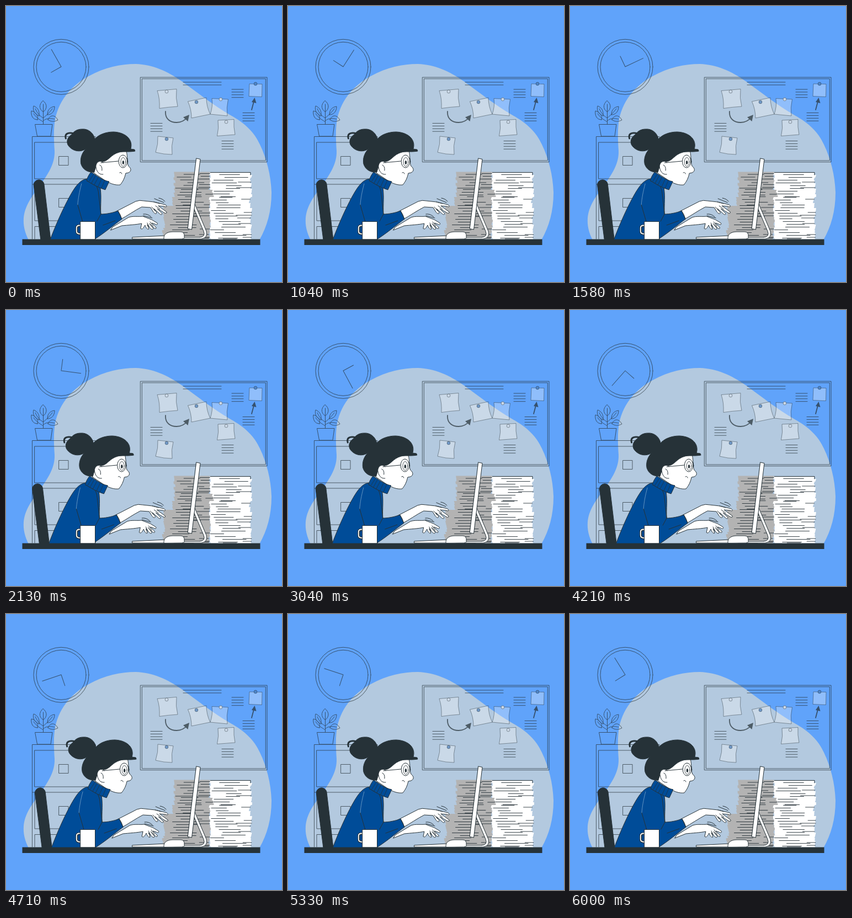
An HTML page for the animation above (6.04 s loop, 500 by 500 pixels).

```html
<!DOCTYPE html>
<html lang="en">
<head>
<meta charset="utf-8">
<title>Busy desk</title>
<style>
html, body { margin: 0; width: 100%; height: 100%; overflow: hidden; background: #60a3fa; }
svg { display: block; width: 100vw; height: 100vh; }
.line { fill: none; stroke: #263238; stroke-width: 1; stroke-linecap: round; stroke-linejoin: round; }
.white { fill: #fff; }
.navy { fill: #004c98; }
.dark { fill: #263238; }
</style>
</head>
<body>
<svg viewBox="0 0 500 500">
  <path fill="#b3c9df" d="M41 424C34 411 31 397 32 384C34 362 47 345 60 327C76 305 89 286 88 262C87 245 86 229 88 212C93 173 118 144 150 127C179 111 208 105 235 105C266 106 292 118 318 136C347 157 376 180 407 198C434 213 450 229 460 251C472 276 480 306 481 338C481 371 473 400 459 424Z"/>

  <g class="line" opacity=".72">
    <circle cx="100" cy="110.300" r="50"/>
    <circle cx="100" cy="110.300" r="45"/>
    <path id="hands" d="M100 74V110H79"/>
    <path d="M47.500 422V236.500H162V422M52 247H157V313H52ZM47.500 323H162M52 323V389H157V323M52 422V399.500H157V422M96 272.500H113V288.500H96ZM96 348.500H113V364.500H96Z"/>
    <path d="M53 214.500H84L81 236H57ZM67.500 214V178M67.500 210C62 206 56 204 50 195M67.500 208C73 203 80 203 88 205M67.500 203C61 199 57 195 53 186M67.500 203C73 198 78 194 84 186"/>
    <path d="M67.500 192C59 186 60 178 67 171.500C75 178 75 186 67.500 192ZM60 199C51 196 48 188 50 181C58 184 61 191 60 199ZM75 197C75 188 80 183 88 182C88 191 83 197 75 197ZM57 206C48 206 45 198 46 190C54 192 59 199 57 206ZM76 206C80 197 88 196 94 206.500C88 210 81 210 76 206Z"/>
    <path d="M243.700 129.200H473V282.700H243.700ZM246.700 131.800H470.300V280H246.700ZM321 138H390M321 143H390"/>
    <path id="memos"/>
  </g>

  <g id="notes" stroke="#263238" stroke-opacity=".5" stroke-width=".9" stroke-linejoin="round"></g>
  <g opacity=".72">
    <path class="line" style="stroke-width:1.800" d="M289 191C288 205 298 211 309 211C319 211 325 206 329 201M445 188L449 173"/>
    <path class="dark" d="M332 197L329.500 209L321 201.500ZM450.500 166L453.500 176L445 174Z"/>
  </g>

  <g id="papers" class="line"></g>
  <g class="line">
    <path class="white" d="M340 354L363 408Q366 420 354 422H318V419H351Q362 418 358 408L338 361Z"/>
    <path class="white" d="M345 276L352 277.500L336.500 405L329.500 403.500Z"/>
  </g>

  <g id="worker" class="line">
    <path class="dark" d="M63 423L50.300 324A9.500 9.500 0 0 1 69 322L81 423Z"/>
    <path class="white" d="M194 400L222 383C230 380 240 382 248 381L264 387L274 393C276 396 273 397 270 395L264 393L272 401C273 405 269 403 267 401L260 394L267 403C266 407 262 403 260 401L256 396L259 404C256 406 253 400 252 397C248 404 247 405 244 403L246 394C237 396 220 397 210 398L190 406Z"/>
    <path d="M249 377Q257 376 263 382M249 380L265 384M269 349L286 356M277 348Q284 349 288 354M256 393L260 401M261 391L267 399"/>
    <path class="white" d="M198 373L235 354Q242 351 250 353L268 355L289 360C293 363 291 365 287 363L276 362L291 373C292 376 289 376 286 374L274 367L283 376C283 379 280 378 278 376L268 367L273 374C273 378 269 376 267 373L262 365L246 364C234 370 220 380 207 387Z"/>
    <path d="M268 355L279 358M271 362L279 368M264 364L270 371"/>
    <path class="navy" d="M80 424C90 397 103 368 115 346C125 328 134 314 148 313L170 325C174 340 171 361 172 377C181 377 193 375 203 371L210 386C195 397 179 411 160 423Z"/>
    <path d="M147 317C160 318 167 326 168 341L172 377M172 377L165 390M130 360L139 391M203 371Q208 378 210 386M176 397L198 389"/>
    <path d="M137 322C133 337 131 348 130 360" style="stroke:#c5d8e8;stroke-width:.5"/>
    <path class="white" d="M158 290L172 268L218 262C221 273 219 284 222 290C227 294 228 299 222 302L217 303C215 312 212 318 207 324C198 325 190 322 181 317L160 303Z"/>
    <path class="navy" d="M154 301C164 307 175 316 187 318L180 333C167 329 157 323 146 316C148 310 150 306 154 301Z"/>
    <path d="M158 306L151 317M162 308L155 321M167 311L160 324M173 314L167 327M179 316L173 330" style="stroke-width:.7"/>
    <path class="dark" d="M147 257C138 264 134 276 136 286C139 296 148 302 160 301L165 284L176 282C187 280 190 269 205 265C212 263 221 265 234 263L233 260L226 259C231 243 218 229 195 228C181 228 168 233 161 241C159 230 149 222 138 223C129 223 123 227 119 233C113 237 109 243 112 251C118 262 135 268 147 257Z"/>
    <path d="M108.500 240C106 232 112 228 123 231" style="stroke-width:3"/>
    <path class="white" d="M176 284C171 278 163 283 163 291C164 299 168 306 176 305"/>
    <path d="M170 288Q175 290 174 298M172 284L204 281"/>
    <ellipse class="white" cx="212" cy="281.500" rx="7.700" ry="11.500"/>
    <path d="M206 302Q209 300 210 304M220 276L221 283"/>
    <ellipse class="white" cx="212.500" cy="282.500" rx="4.400" ry="8" style="stroke-width:.8"/>
    <ellipse class="dark" cx="212.500" cy="283.500" rx="1.200" ry="3.200"/>
  </g>

  <g class="line">
    <path class="white" d="M229 419L290 416V422H229Z"/>
    <path class="white" d="M286 422C285 414 291 409 302 409H316C321 409 323 412 323 416V420Q322 422 319 422Z"/>
    <path d="M135 398H132Q128.300 398 128.300 402V409Q128.300 413 135 413" style="stroke-width:4.500"/>
    <path d="M135 397.500H132Q127.800 398 127.800 402V408Q127.800 413 135 413" style="stroke:#fff;stroke-width:1.800"/>
    <path class="white" d="M135 390.500H161.500V423H135Z"/>
  </g>
  <path class="dark" d="M29.500 422.500H460.500V433H29.500Z"/>
</svg>
<script>
const LOOP = 6040;
const SHAKE_PERIOD = 3020;
const SHAKE_DELAY = 50;
const SHAKE = [0, -1, 2, -4, 4, -4, 4, -4, 2, -1, 0];
const byId = id => document.getElementById(id);

function add(parent, tag, attrs) {
  const node = document.createElementNS("http://www.w3.org/2000/svg", tag);
  for (const key in attrs) node.setAttribute(key, attrs[key]);
  parent.append(node);
}

function seeded(seed) {
  return () => (seed = seed * 16807 % 2147483647) / 2147483647;
}

function drawNote(path, x, y, pinFill) {
  add(byId("notes"), "path", { d: path, fill: "#fff", "fill-opacity": .3 });
  add(byId("notes"), "circle", { cx: x, cy: y, r: 2.9, fill: pinFill });
}

// A ragged pile: torn side edges plus horizontal page lines.
function drawPile(left, right, top, bottom, fill, seed) {
  const random = seeded(seed);
  const leftEdge = [], rightEdge = [];
  let lines = "";
  for (let y = top; y < bottom; y += 5) {
    const end = Math.min(y + 5, bottom);
    const a = left + random() * 3.5, b = right - random() * 3.5;
    leftEdge.push(`${a} ${y}`, `${a + random() * 2} ${end}`);
    rightEdge.push(`${b} ${y}`, `${b - random() * 2} ${end}`);
    const width = b - a;
    lines += `M${a + random() * width * .4} ${end - .5}h${width * (.3 + random() * .3)}`;
    if (random() > .5) lines += `M${b} ${end - 2}h${-width * (.15 + random() * .25)}`;
  }
  const d = "M" + leftEdge.concat(rightEdge.reverse()).join("L") + "Z";
  add(byId("papers"), "path", { d, style: `fill:${fill};stroke:none` });
  add(byId("papers"), "path", { d: lines, style: "stroke-width:.9" });
}

const PIN = "#7199c8", PALE = "#ccd9e8";
drawNote("M274 153.500L309 150.500Q307 167 311 182Q294 183 278 185.500Q279 168 274 153.500Z", 291, 155, PALE);
drawNote("M329.500 173L363 166Q363 182 370 196L336 203Q336 187 329.500 173Z", 345, 174, PIN);
drawNote("M373 167.500L402.500 169Q399 184 401 199L370 196Q375 182 373 167.500Z", 389, 169, PALE);
drawNote("M384 207L413 205.500Q412 219 415 233L382.500 235.500Q386 221 384 207Z", 399, 210, PALE);
drawNote("M275 236L303 239Q299 253 301 269Q286 269 271 265Q276 250 275 236Z", 291, 241, PIN);
drawNote("M441 141L464 141.500L463.500 164.500L440 163.500Z", 452, 141, "#4d85ca");

byId("memos").setAttribute("d", [[409, 151], [429, 193.5], [391, 244.5], [262, 212.5]]
  .map(([x, y]) => [0, 1, 2, 3].map(i => `M${x} ${y + i * 4.9}h21`).join("")).join(""));

const GREY = "#b3b3b3";
drawPile(367, 446, 301, 347, "#fff", 7100);
drawPile(366, 444, 347, 361, "#fff", 31500);
drawPile(367, 446, 361, 422.5, "#fff", 92300);
drawPile(303, 371, 300.5, 333, GREY, 44120);
drawPile(303, 377, 333, 346, GREY, 81800);
drawPile(299, 371, 346, 362, GREY, 55190);
drawPile(284, 371, 362, 406, GREY, 27610);
drawPile(281, 370, 406, 422.5, GREY, 62030);
add(byId("papers"), "path", { d: "M370 301.500H443V306" });

function shakeOffset(time) {
  const position = (time + SHAKE_DELAY) % SHAKE_PERIOD / SHAKE_PERIOD * 10;
  const i = Math.floor(position);
  return SHAKE[i] + (SHAKE[i + 1] - SHAKE[i]) * (position - i);
}

function render(time) {
  byId("hands").setAttribute("transform", `rotate(${time / LOOP * 360 - 29.5} 100 110)`);
  byId("worker").setAttribute("transform", `translate(${shakeOffset(time)} 0)`);
}

const started = performance.now();
function tick() {
  render((performance.now() - started) % LOOP);
  requestAnimationFrame(tick);
}
tick();
</script>
</body>
</html>
```
